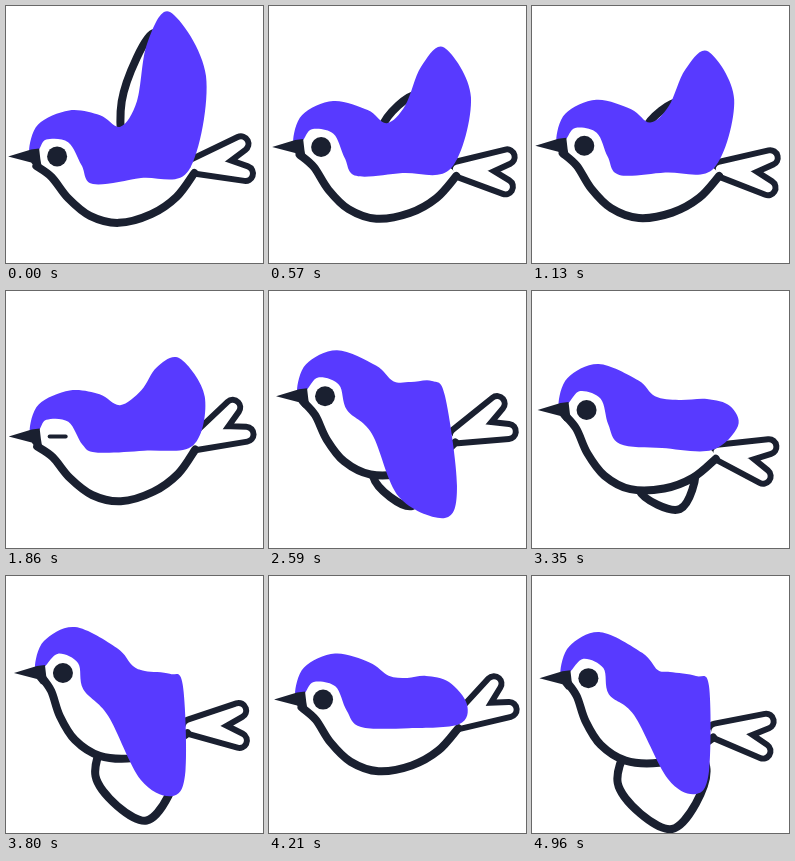
These frames come from a looping animation (257x257 px, 5010 ms). An HTML page:

```html
<!DOCTYPE html>
<html lang="en">
<head>
<meta charset="utf-8">
<title>Flying bird</title>
<style>
  html, body { margin: 0; height: 100%; overflow: hidden; background: #fff; }
  svg { display: block; width: 100%; height: 100%; }
  path { fill: none; stroke-linecap: round; stroke-linejoin: round; }
  .ink { stroke: #1a2030; }
  .white { fill: #fff; }
</style>
</head>
<body>
<svg viewBox="0 0 257 257">
  <path id="farWing" class="ink white" stroke-width="8"/>
  <path id="tailEdge" class="ink" stroke-width="21" style="fill:#1a2030"/>
  <path id="tail" class="white" stroke="#fff" stroke-width="9"/>
  <path id="body" class="white"/>
  <path id="belly" class="ink" stroke-width="8"/>
  <path id="coat" style="fill:#583aff"/>
  <path id="beak" style="fill:#1a2030"/>
  <path id="eye" class="ink"/>
</svg>
<script>
const LOOP = 5010, HOLD = 105, STEP = 51.05, STEPS_PER_FLAP = 11.1;
const BLINK = [1770, 1960];

// Wing beat: outline from neck round the tip to the chest; far wing as tip x, tip y, half width
const beat = [
  { at: 0, far: [148, 27, 21],     // raised
    wing: [131,95, 141,38, 164,6, 200,70, 183,164, 135,172, 87,178] },
  { at: .297, far: [170, 138, 10], // folded, going down
    wing: [138,102, 157,100, 180,106, 198,128, 190,148, 140,152, 92,151] },
  { at: .414, far: [143, 215, 30], // lowered
    wing: [142,91, 163,90, 176,105, 188,195, 176,227, 130,206, 103,143] },
  { at: .649, far: [140, 253, 45], // lowered, swept back
    wing: [138,96, 164,100, 177,110, 177,195, 164,218, 136,203, 102,139] },
  { at: .766, far: [148, 218, 30], // level, going up
    wing: [147,109, 175,108, 198,115, 206,135, 180,159, 130,157, 88,153] }
];

// Parts measured from the eye along the body axis
const BODY_LENGTH = 138;
const bellyShape = [[-20, 11], [-4, 21], [14, 41], [37, 57], [66, 62], [98, 51], [122, 32], [138, 7]];
const backShape = [[110, -5], [35, -4], [11, -14], [-12, -15], [-22, -2]];
const nape = [[40, -44], [61, -34]];
const faceEdge = [[25, 7], [10, -15], [-12, -16]];
// The crown stays level
const crown = [[-19, -6], [-28, -6], [-19, -32], [12, -46]];

const wave = (phase, mean, swing, peak) => mean + swing * Math.cos(2 * Math.PI * (phase - peak));
const mix = (a, b, u) => a.map((v, i) => v + (b[i] - v) * u);
const add = (a, b) => [a[0] + b[0], a[1] + b[1]];

// Point turned by an angle in degrees
function turn([x, y], angle) {
  const r = angle * Math.PI / 180, c = Math.cos(r), s = Math.sin(r);
  return [x * c - y * s, x * s + y * c];
}

function pairs(list) {
  const points = [];
  for (let i = 0; i < list.length; i += 2) points.push([list[i], list[i + 1]]);
  return points;
}

function wingsAt(phase) {
  const i = beat.findLastIndex(b => b.at <= phase);
  const from = beat[i], to = beat[(i + 1) % beat.length];
  const u = (phase - from.at) / ((to.at || 1) - from.at);
  const eased = u * (1.4 - .4 * u);
  return { wing: pairs(mix(from.wing, to.wing, eased)), far: mix(from.far, to.far, eased) };
}

// Smooth path through points
function spline(points, closed) {
  const n = points.length;
  const at = i => points[closed ? (i + n) % n : Math.max(0, Math.min(n - 1, i))];
  let d = "M" + points[0];
  for (let i = 0; i < (closed ? n : n - 1); i++) {
    const [a, b, c, e] = [-1, 0, 1, 2].map(k => at(i + k));
    const c1 = b.map((v, k) => v + (c[k] - a[k]) / 6);
    const c2 = c.map((v, k) => v - (e[k] - b[k]) / 6);
    d += `C${c1} ${c2} ${c}`;
  }
  return d + (closed ? "Z" : "");
}

// Leaf from shoulder to tip
function leaf(shoulder, tip, halfWidth) {
  const [dx, dy] = [tip[0] - shoulder[0], tip[1] - shoulder[1]];
  const k = halfWidth / Math.hypot(dx, dy), middle = mix(shoulder, tip, .5);
  const side = [-dy * k, dx * k];
  return spline([shoulder, add(middle, side), tip, add(middle, [-side[0], -side[1]])], true);
}

const set = (id, d) => document.getElementById(id).setAttribute("d", d);

function draw(now) {
  const t = now % LOOP;
  const step = Math.max(0, Math.floor((t - HOLD) / STEP) + 1);
  const phase = step / STEPS_PER_FLAP % 1;

  const eye = [wave(phase, 54, -3, .045), wave(phase, 124, 27.5, .045)];
  const pitch = wave(phase, 12.5, -10.5, .1);
  const tailAngle = wave(phase, -10, -21, .26);
  const onBody = p => add(eye, turn(p, pitch));
  const { wing, far } = wingsAt(phase);

  const root = onBody([BODY_LENGTH, 0]);
  const onTail = p => add(root, turn(p, tailAngle));
  const tail = `M${root}L${onTail([49, -15])}L${onTail([21, 0])}L${onTail([49, 15])}Z`;
  const belly = bellyShape.map(onBody);

  set("farWing", leaf(onBody([75, 15]), far.slice(0, 2), far[2]));
  set("tailEdge", tail);
  set("tail", tail);
  set("body", spline([...belly, ...backShape.map(onBody)], true));
  set("belly", spline(belly, false));
  set("coat", spline([...crown.map(p => add(eye, p)), ...nape.map(onBody), ...wing, ...faceEdge.map(onBody)], true));

  const [x, y] = eye;
  set("beak", `M${x - 49} ${y}L${x - 26} ${y - 7}L${x - 18} ${y - 8}Q${x - 17} ${y + 3} ${x - 15} ${y + 13}L${x - 22} ${y + 11}L${x - 26} ${y + 6}Z`);

  const shut = t >= BLINK[0] && t < BLINK[1];
  set("eye", shut ? `M${x - 8} ${y}h16` : `M${x} ${y}h.01`);
  document.getElementById("eye").setAttribute("stroke-width", shut ? 4 : 20);
}

function tick() {
  draw(performance.now());
  requestAnimationFrame(tick);
}
tick();
</script>
</body>
</html>
```
